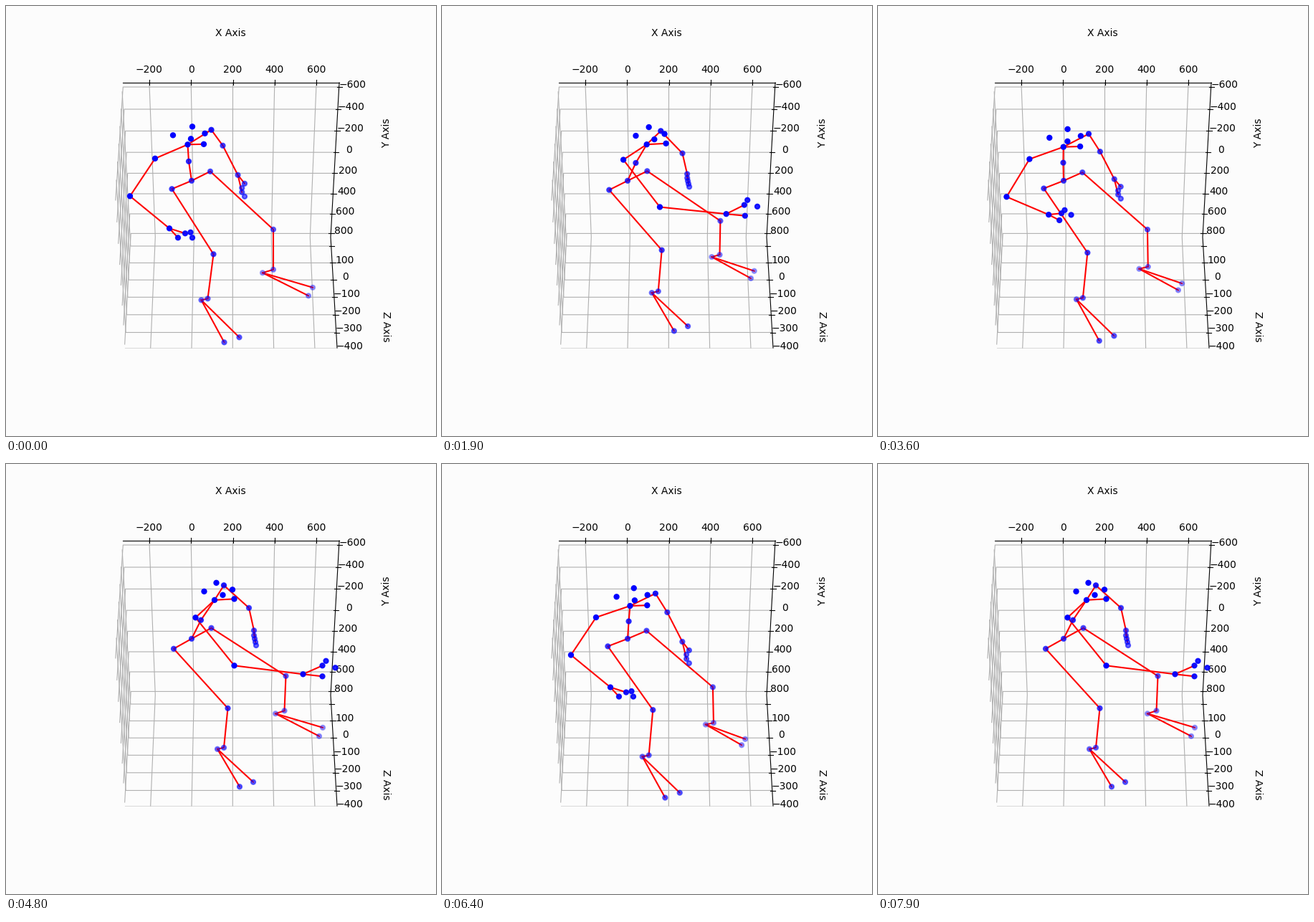
A matplotlib script for the animation above (8000 ms loop, 600 by 600 pixels).

```python
import numpy as np
import matplotlib.pyplot as plt
from matplotlib.animation import FuncAnimation
from matplotlib.collections import LineCollection

FRAMES, STEP = 80, 100

fig = plt.figure(figsize=(6, 6), dpi=100, facecolor="#fcfcfc")
ax = fig.add_axes([0, 0, 1, 1])
ax.set(xlim=(0, 600), ylim=(600, 0))
ax.axis("off")


# ---- projected box -------------------------------------------------------
def mix(p, q, f):
    return p + (q - p) * f


def add_lines(segs, color, width, z):
    coll = LineCollection(segs, colors=color, linewidths=width, zorder=z,
                          capstyle="projecting")
    ax.add_collection(coll)
    return coll


def label(x, y, value):
    ax.text(x, y + 4, str(value).replace("-", "\u2212"), fontsize=10,
            ha="center", va="baseline")


# corners of the left side pane, then of its right-hand counterpart
top, fold, base, back = np.array([(163, 107), (174.5, 322.5), (166, 477), (152.5, 265)])
r_top, r_fold, r_base = np.array([(465, 107), (453, 322.5), (462, 477)])
grid, ticks = [], []


def add_row(y, start, end, r_start, r_end, b_start, b_end):
    f = (y - start[1]) / (end[1] - start[1])
    right = mix(r_start, r_end, f)
    grid.append([mix(b_start, b_end, f), mix(start, end, f), right])
    ticks.append([right - (3, 0), right + (4.5, 0)])


for i in range(8):
    y = 113 + 31.3 * i - 0.3 * i * i
    add_row(y, top, fold, r_top, r_fold, back, base)
    label(483.7 - 1.75 * i, y - 3, 200 * i - 600)
for i in range(7):
    y = 335 + 23.3 * i + 0.16 * i * i
    if i < 6:
        add_row(y, fold, base, r_fold, r_base, top, back)
    if i > 0:
        label(470.9 + 1.45 * i, y - 3 - 0.4 * i, 200 - 100 * i)
for i in range(-2, 3):
    x = 316.5 + 58.3 * i
    grid.append([(x, 107), (316.3 + 54 * i, 322.5), (316.3 + 57.3 * i, 477)])
    ticks.append([(x, 102.5), (x, 109.5)])
    label(x, 89, 200 * i + 200)

add_lines(grid, "#b0b0b0", 0.8, 1)
add_lines([[base, r_base]], "#dcdcdc", 0.8, 0.9)
add_lines(ticks + [[top, r_top], [r_top, r_fold, r_base]], "black", 0.8, 1.5)
label(313.5, 38.5, "X Axis")
ax.text(531, 177.5, "Y Axis", rotation=90, ha="center", va="center")
ax.text(529.5, 447, "Z Axis", rotation=270, ha="center", va="center")

# ---- skeleton: each joint hangs from a parent by an offset that swings ----
# from wound-up to struck, bowing away from the straight path halfway
BODY, ARM, FORE = range(3)
parents, wound, struck, bows, channels, alphas, bones = [], [], [], [], [], [], []


def joint(parent, start, end=None, bow=(0, 0), by=BODY, alpha=1, bone=True):
    n = len(parents)
    parents.append(parent)
    wound.append(start)
    struck.append(start if end is None else end)
    bows.append(bow)
    channels.append(by)
    alphas.append(alpha)
    if bone:
        bones.append((parent, n))
    return n


pelvis = joint(0, (259, 243.8), alpha=0.68, bone=False)
spine = joint(pelvis, (-4, -27), (13, -26), (1, 3), alpha=0.75)
neck = joint(spine, (-1.5, -23.5), (19, -28), (-3, 4))

# head points: offset from the neck and sideways turn
joint(neck, (22.5, -0.5), (27.5, -1.5))
for x, y, turn in ((-20.5, -13, 6), (6.5, -25, -4), (4.5, -8, 7), (24, -15.5, 1)):
    joint(neck, (x, y), (x + turn, y + 1), bone=False)

# left arm
shoulder = joint(neck, (-45.5, 19.5), (-26.5, 24.5), (-9, -6))
elbow = joint(shoulder, (-35, 52.5), (54, 67), (3, -3), ARM)
wrist = joint(elbow, (55, 45), (96, 12), (-7, -21), FORE, 0.92)
joint(wrist, (22, 7), (27, -12), (-8, -8), FORE, 0.88)
joint(wrist, (12, 13), (27, 3), (0, -5), FORE, 0.88)
joint(wrist, (29.5, 5.5), (32, -18.5), (-12, -11), FORE, 0.88, bone=False)
joint(wrist, (32, 13), (45, -9), (-5, -13), FORE, 0.88, bone=False)

# right arm, fingers in a row
shoulder = joint(neck, (33, -20.5), (13, -20.5), (10, 4), alpha=0.83)
elbow = joint(shoulder, (16, 22), (35, 31.5), (-6, 2), alpha=0.65)
wrist = joint(elbow, (21, 41), (7, 31.5), (-6, -20), ARM, 0.6)
for k in range(4):
    joint(wrist, (7 + 2.5 * np.cos(2 * np.pi * k / 3), 12 + 6 * k), (k, 7 + 4.6 * k),
          (-2, -10.5 - 3.6 * k), ARM, 0.58, bone=k in (0, 2))

# left leg
hip = joint(pelvis, (-27.5, 11.5), (-25, 14), (-1, -2), alpha=0.68)
knee = joint(hip, (58, 91), (75.5, 83), alpha=0.67)
ankle = joint(knee, (-8, 62), (-5.5, 55), (2, 4), alpha=0.52)
heel = joint(ankle, (-9, 2), alpha=0.48)
joint(heel, (32, 59), (31, 52.5), alpha=0.58)
joint(heel, (53, 52), (50, 46), alpha=0.56)

# right leg
hip = joint(pelvis, (26, -13), (27.5, -15), (0, 3), alpha=0.6)
knee = joint(hip, (88, 81), (104, 67), (0, 2), alpha=0.54)
ankle = joint(knee, (0, 56), (-2, 48.5), (2, -5), alpha=0.4)
heel = joint(ankle, (-15, 4.5), (-12.5, 4), (4, -2.5), alpha=0.34)
joint(heel, (70, 20.5), (66, 19.5), (-17, 0), alpha=0.34)
joint(heel, (64, 32), (61, 31.5), (-16, -4), alpha=0.36)

wound, struck, bows = map(np.array, (wound, struck, bows))
bones = np.array(bones)

# ---- motion: time, then swing of body, arm and forearm (0 wound, 1 struck) -
keys = np.array([
    (0, 0, 0, 0), (400, 0.1, 0, 0.12), (800, 0.6, 0.52, 0.4), (1100, 1, 1, 1),
    (1900, 0.88, 0.96, 0.95), (2650, 0.95, 1, 1), (3350, 0.05, 0.05, 0),
    (3600, 0.17, 0.03, 0.2), (4000, 0.15, -0.08, 0.15), (4480, 0.65, 0.55, 0.45),
    (4800, 1, 1, 1), (5250, 1.04, 1.04, 1.04), (6400, 0.28, 0, 0),
    (6600, 0.28, -0.02, 0.05), (7175, 0.6, 0.52, 0.4), (7450, 1.03, 1.03, 1.03),
    (7900, 1, 1, 1),
])
T, S = keys[:, 0], keys[:, 1:]

# monotone cubic: flat at turning points, harmonic mean of slopes between
rate = np.diff(S, axis=0) / np.diff(T)[:, None]
r0, r1 = rate[:-1], rate[1:]
same = r0 * r1 > 0
slope = np.zeros_like(S)
slope[1:-1][same] = (2 * r0 * r1)[same] / (r0 + r1)[same]


def swing_at(t):
    k = min(np.searchsorted(T, t, "right") - 1, len(T) - 2)
    h = T[k + 1] - T[k]
    u = (t - T[k]) / h
    return ((1 + 2 * u) * (1 - u) ** 2 * S[k] + u * (1 - u) ** 2 * h * slope[k]
            + u * u * (3 - 2 * u) * S[k + 1] + u * u * (u - 1) * h * slope[k + 1])


def pose_at(t):
    s = swing_at(t)[channels][:, None]
    p = mix(wound, struck, s) + bows * 4 * s * (1 - s)
    for n in range(1, len(p)):
        p[n] += p[parents[n]]
    return p


rgba = [(0, 0, 1, a) for a in alphas]
start = pose_at(0)
limbs = add_lines(start[bones], "red", 1.5, 2)
dots = ax.scatter(*start.T, s=20, color=rgba, linewidths=1.5, zorder=3)


def draw(n):
    p = pose_at(n * STEP)
    limbs.set_segments(p[bones])
    dots.set_offsets(p)
    return limbs, dots


anim = FuncAnimation(fig, draw, frames=FRAMES, interval=STEP, repeat=True, repeat_delay=0)
plt.show()
```
